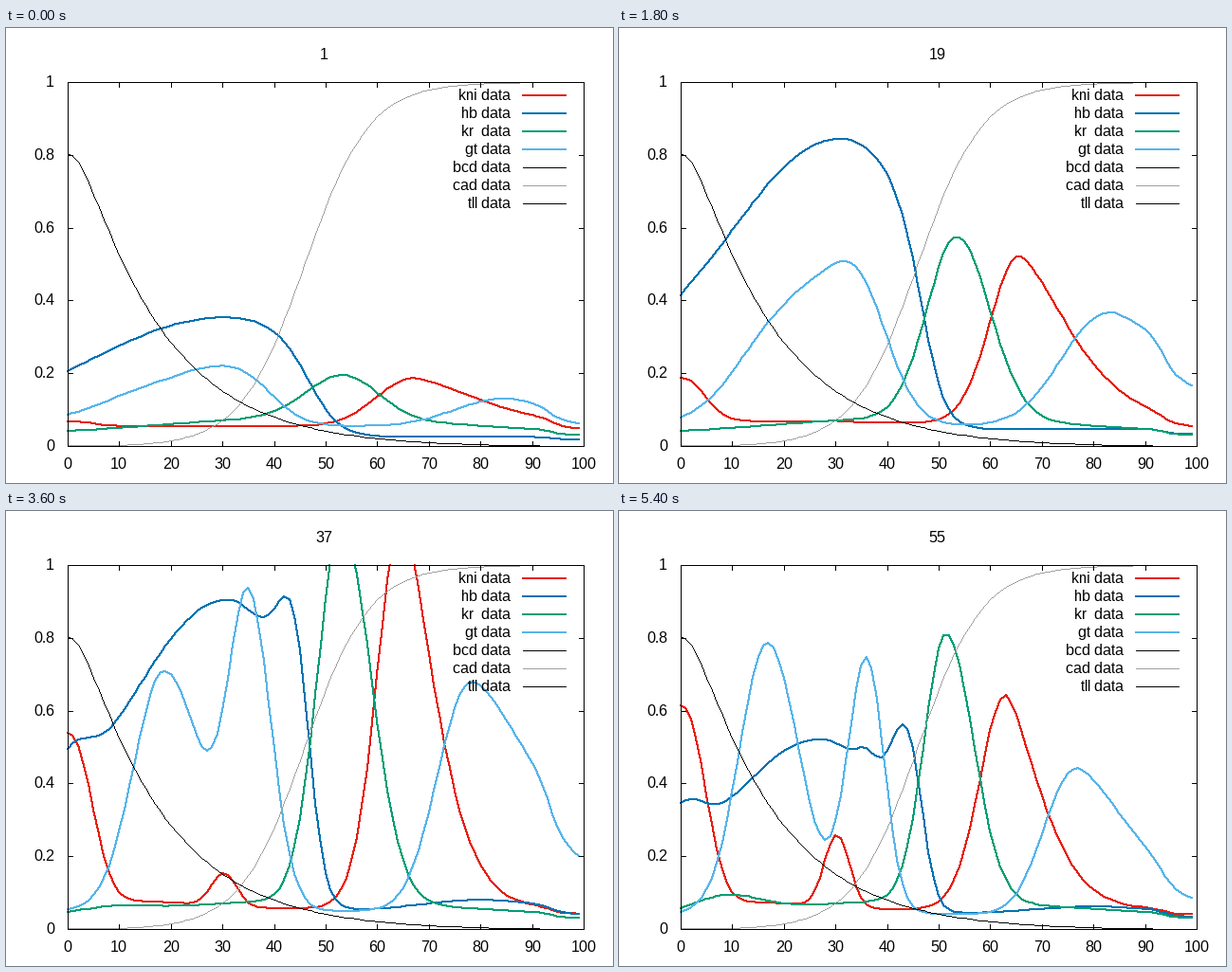
Recreate the animation shown at these times as a matplotlib script. Size 640 by 480 pixels, loop 5.5 s.

```python
import numpy as np
import matplotlib.pyplot as plt
from matplotlib.animation import FuncAnimation

W, H, DPI = 640, 480, 100
LEFT, RIGHT, TOP, BOTTOM = 65, 609, 57, 441
PX = 72 / DPI  # one pixel in points
STEPS, INTERVAL = 55, 100
FRONT = 20

plt.rcParams.update({
    "font.family": "Liberation Sans",
    "font.size": 16 * PX,
    "text.hinting": "default",
    "text.hinting_factor": 1,
    "path.simplify": False,
})

x = np.arange(100.0)


def track(*keys):
    """Column of one value per step, eased through evenly spaced keys."""
    keys = np.array(keys, float)
    slope = np.gradient(keys)
    pos = np.linspace(0, len(keys) - 1, STEPS)
    i = np.minimum(pos.astype(int), len(keys) - 2)
    t = pos - i
    value = (keys[i] * (1 + 2 * t) * (1 - t) ** 2 + keys[i + 1] * t * t * (3 - 2 * t)
             + slope[i] * t * (1 - t) ** 2 - slope[i + 1] * t * t * (1 - t))
    return value[:, None]


def bump(height, center, left, right, p=2, q=2):
    """Bell with its own width and power on each side."""
    d = x - center
    fall = np.where(d < 0, (abs(d) / left) ** p, (abs(d) / right) ** q)
    return height * np.exp(-fall)


def sigmoid(v):
    return 1 / (1 + np.exp(-v))


def kni():
    base = track(.055, .064, .058, .055)
    head = bump(track(.013, .055, .118, .285, .46, .555, .54), 0, 6.2, 6.2, q=2.3)
    shelf = bump(track(0, .005, .02, .02), 0, 28, 28, q=4)
    stripe = bump(track(0, 0, .004, .02, .09, .18, .2), 30.3, 3.4, 3.4)
    main = bump(track(.132, .28, .46, .84, 1.08, .87, .587),
                track(67, 65.6, 64.9, 63),
                track(10, 7.9, 6.8, 7.1),
                track(18, 16, 14, 10.3, 8.9, 9, 9.5), q=1.5)
    return base + head + shelf + stripe + main


def hb():
    base = track(.025, .037, .045, .05, .05, .048, .042)
    hill = bump(track(.33, .575, .8, .935, .855, .68, .48),
                track(31, 31, 31, 27), track(40, 34, 30, 26), track(40, 30, 20, 20))
    head = bump(track(0, 0, .02, .12, .15, .15, .14), 0, 6, 6)
    ridge = bump(track(0, 0, 0, .2, .42, .36, .37), 45, 5, 5)
    notch = bump(track(0, 0, 0, .05), 36, 2.5, 2.5)
    edge = sigmoid((47.3 - x) / track(3, 2.3, 2, 1.8))
    tail = bump(track(0, .003, .03, .02), 80, 16, 16)
    return base + edge * (hill + head + ridge + notch) + tail


def kr():
    base = .03 + bump(.047, 45, 38, 45)
    head = bump(track(0, 0, 0, 0, .015, .037, .045), 9, 9, 9)
    main = bump(track(.12, .3, .5, .81, 1.03, .98, .735),
                track(53.3, 53.5, 53, 51.4),
                track(9.8, 8.1, 6.5, 5.9), track(9.7, 9.1, 8.2, 7.5))
    return base + head + main


def gt():
    base = track(.055, .057, .05, .042)
    first = bump(track(.12, .185, .3, .52, .66, .745, .745),
                 track(21, 21, 18.7, 16.8),
                 track(18, 13, 8.3, 7.6), track(10, 10, 10.3, 8.6))
    second = bump(track(.13, .22, .38, .63, .835, .81, .7),
                  track(33.5, 34, 35.1, 36),
                  track(9, 9, 5.5, 5.2), track(9, 8.6, 6.1, 4.8))
    third = bump(track(.076, .165, .31, .53, .63, .545, .4),
                 track(85.5, 83.5, 78.6, 77),
                 track(14, 13, 9.3, 8.8), track(14, 22, 20, 15.5), p=2.2, q=1.5)
    return base + first + second + third


def to_px(level):
    return np.round(BOTTOM - (BOTTOM - TOP) * level)


def stamps(xs, ys, width):
    """Square brush stamps along a polyline, as short separate dashes."""
    px, py = [], []
    for x0, y0, x1, y1 in zip(xs, ys, xs[1:], ys[1:]):
        n = int(max(abs(x1 - x0), abs(y1 - y0))) + 1
        px.append(np.linspace(x0, x1, n))
        py.append(np.linspace(y0, y1, n))
    px = np.floor(np.concatenate(px) + 0.5)
    py = np.floor(np.concatenate(py) + 0.5)
    inside = py >= TOP
    px, py = px[inside], py[inside]
    gap = np.full(len(px), np.nan)
    mid = py + 1 - width / 2
    return (np.column_stack([px + 1 - width, px + 1, gap]).ravel(),
            np.column_stack([mid, mid, gap]).ravel())


fig = plt.figure(figsize=(W / DPI, H / DPI), dpi=DPI, facecolor="white")
ax = fig.add_axes([0, 0, 1, 1])
ax.set_xlim(0, W)
ax.set_ylim(H, 0)
ax.axis("off")
cell_px = np.round(LEFT + (RIGHT - LEFT) / 100 * x)


def stroke(xs, ys, color="black", width=1, z=FRONT):
    line, = ax.plot(*stamps(xs, ys, width), color=color, lw=width * PX, zorder=z,
                    antialiased=False, snap=False, solid_capstyle="butt")
    return line


def label(lx, ly, text, ha="center", z=FRONT):
    return ax.text(lx, ly, text, ha=ha, va="baseline", color="black", zorder=z)


def draw_axes():
    stroke([LEFT, RIGHT, RIGHT, LEFT, LEFT], [TOP, TOP, BOTTOM, BOTTOM, TOP])
    for n in range(11):
        tx = round(LEFT + n * (RIGHT - LEFT) / 10)
        stroke([tx, tx], [TOP, TOP + 5])
        stroke([tx, tx], [BOTTOM - 5, BOTTOM])
        label(tx, 465, str(10 * n))
    for n in range(6):
        ty = to_px(n / 5)
        stroke([LEFT, LEFT + 5], [ty, ty])
        stroke([RIGHT - 5, RIGHT], [ty, ty])
        label(51, ty + 5, f"{n / 5:g}", ha="right")


taper = 1 - .27 * sigmoid(x - 93.8)  # all four genes sag at the far end
bcd = np.exp(.036 - .063 * np.hypot(x, 4)) - .002
cad = np.maximum(sigmoid(.16 * (x - 45.9)), .002)

series = [
    ("kni data", "#e51e10", 2, kni() * taper),
    ("hb data", "#0072b2", 2, hb() * taper),
    ("kr  data", "#009e73", 2, kr() * taper),
    ("gt data", "#56b4e9", 2, gt() * taper),
    ("bcd data", "black", 1, bcd),
    ("cad data", "#a0a0a0", 1, cad),
    ("tll data", "black", 1, 0 * x),
]

draw_axes()
title = label(335.5, 33, "1")
moving = []
for row, (name, color, width, levels) in enumerate(series):
    y = 71 + 19 * row
    label(532, y + 5, name, ha="right", z=row)
    stroke([545, 590], [y, y], color, width, row)
    poses = np.atleast_2d(levels)
    line = stroke(cell_px, to_px(poses[0]), color, width, row)
    if len(poses) > 1:
        moving.append((line, width, poses))


def update(i):
    title.set_text(str(i + 1))
    for line, width, poses in moving:
        line.set_data(*stamps(cell_px, to_px(poses[i]), width))
    return [title] + [line for line, *_ in moving]


anim = FuncAnimation(fig, update, frames=STEPS, interval=INTERVAL,
                     repeat=True, repeat_delay=0, blit=False)
plt.show()
```
